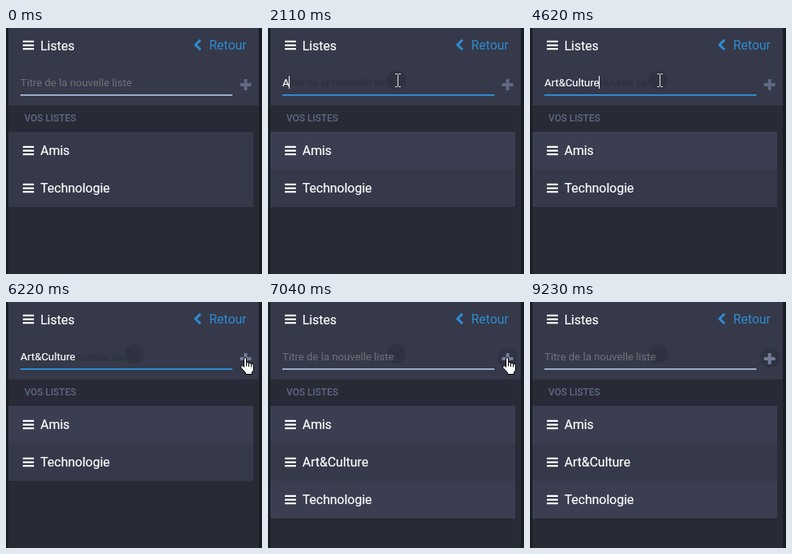
An HTML page that plays this animation: 320 by 308 pixels, repeating every 9.84 s.

```html
<!DOCTYPE html>
<html lang="fr">
<head>
<meta charset="utf-8">
<title>Listes</title>
<style>
  html, body { margin: 0; width: 100%; height: 100%; overflow: hidden; background: #282b36; }
  svg { display: block; width: 320px; height: 308px; font: 16px Roboto, Arial, sans-serif; }
  text { white-space: pre; }
  .label { fill: #fff; stroke: #fff; stroke-width: .2px; }
  .field { font-size: 13.333px; }
  .typed { fill: #fff; stroke: #fff; stroke-width: .15px; }
  .section { font-size: 12px; font-weight: 500; fill: #606984; }
  .link { fill: #2f8bd0; }
</style>
</head>
<body>
<svg viewBox="0 0 320 308">
  <defs>
    <g id="bars" fill="#fff">
      <rect width="14" height="2.3" rx=".6"/>
      <rect y="4.6" width="14" height="2.3" rx=".6"/>
      <rect y="9.2" width="14" height="2.3" rx=".6"/>
    </g>
  </defs>

  <rect width="320" height="308" fill="#282b36"/>
  <rect x="3" width="313" height="97" fill="#353949"/>
  <use href="#bars" x="21" y="15.8"/>
  <text class="label" x="43" y="28">Listes</text>
  <path class="link" d="M242 13.8l2.1 2.1-5.1 5.1 5.1 5.1-2.1 2.1-7.2-7.2z"/>
  <text class="link" x="254" y="27">Retour</text>

  <circle id="inputShade" cx="160.5" cy="65" r="12" fill="#2f3341"/>
  <circle id="plusShade" cx="299.5" cy="70" r="12" fill="#2f3341"/>
  <text id="hint" class="field" x="18" y="73">Titre de la nouvelle liste</text>
  <rect id="cover" x="18" y="60" height="16" fill="#353949"/>
  <text id="typed" class="field typed" x="18" y="73"></text>
  <rect id="caret" y="60" width="1" height="16" fill="#fff"/>
  <rect id="line" x="18" y="83" width="265" height="2"/>
  <path id="plus" d="M297.5 64h4v5h5v4h-5v5h-4v-5h-5v-4h5z" stroke-linejoin="round"/>

  <text class="section" x="23" y="117">VOS LISTES</text>
  <g id="rows"></g>
  <path d="M0 0h3v308h-3zM316 0h4v308h-4z" fill="#1b1d25"/>

  <circle id="click" r="12" fill="#b9b320" fill-opacity=".88"/>
  <g id="cursor">
    <path id="beam" d="M-3.5-7.5h2.5l1 1 1-1h2.5M0-6.5v14M-3.5 8.5h2.5l1-1 1 1h2.5" fill="none" stroke="#e8e8e8"/>
    <path id="arrow" d="M.5.5v15.5l3.6-3.4 2.5 5.7 2.3-1-2.5-5.6h5z" fill="#fff" stroke="#000"/>
    <g id="hand" transform="translate(-6 -1)" stroke="#000">
      <path fill="#fff" d="M4.5 2Q4.5.5 6 .5T7.5 2V7.5Q7.5 6.3 9 6.3T10.5 8Q10.7 7.1 12 7.3T13.5 9Q14 8.2 15 8.6T16.5 10.5V15Q16.5 17.5 14.5 19V21.5H6.5V19.5L1 13.5Q0 12 1 11T3.5 11.3L4.5 12.5Z"/>
      <path fill="none" d="M7.5 7v4.5M10.5 8v4M13.5 9v3.5"/>
    </g>
  </g>
</svg>
<script>
const LOOP = 9840;
const WORD = "Art&Culture";
const BRIGHT = "#3a3e50", DARK = "#353949";

// When each letter of WORD appears
const KEYS = [2110, 2340, 2570, 3260, 3570, 3870, 4020, 4250, 4330, 4550, 4620];
// The caret flips at each of these times
const BLINKS = [1180, 1650, 2110, 3110, 3260, 5160, 5700, 6220, 6680, 6970];
const FOCUS = 1180, CLEAR = 6970, ADDED = 7040;

// time, shape, x, y
const MOVES = [
  [0, "", 0, 0],
  [450, "hand", 291, 152], [520, "hand", 273, 140], [590, "arrow", 249, 124],
  [660, "arrow", 223, 107], [740, "arrow", 197, 91], [810, "beam", 173, 72],
  [880, "beam", 162.5, 65],
  [6080, "arrow", 224, 68], [6150, "arrow", 278, 70], [6220, "hand", 299, 70],
  [8420, "hand", 303, 70],
  [8650, "hand", 307, 78], [8720, "arrow", 309, 114], [8790, "hand", 307, 162],
  [8860, "hand", 301, 212], [8930, "hand", 295, 257],
  [9160, "arrow", 288, 291], [9230, "", 0, 0]
];
const CLICKS = [[1110, 1270, 160.5, 65], [6830, 6970, 299.5, 70]];

const $ = id => document.getElementById(id);
const show = (id, on) => $(id).setAttribute("display", on ? "inline" : "none");
const set = (id, attrs) => { for (const k in attrs) $(id).setAttribute(k, attrs[k]); };
const between = (t, a, b) => t >= a && t < b;
const passed = (list, t) => list.filter(at => at <= t).length;

const rows = ["Amis", "Technologie", "Technologie"].map((name, i) => {
  const g = document.createElementNS("http://www.w3.org/2000/svg", "g");
  g.setAttribute("transform", `translate(0 ${130 + i * 47})`);
  g.innerHTML = `<rect x="3" width="306" height="47"/>
    <use href="#bars" x="21" y="17.8"/><text class="label" x="43" y="29">${name}</text>`;
  $("rows").append(g);
  return { g, box: g.querySelector("rect"), text: g.querySelector("text") };
});

function drawField(t) {
  const focused = between(t, FOCUS, CLEAR);
  const typing = between(t, KEYS[0], CLEAR);
  const text = typing ? WORD.slice(0, passed(KEYS, t)) : "";
  $("typed").textContent = text;
  const end = text ? $("typed").getComputedTextLength() : 0;
  set("cover", { width: typing ? end + 1 : 0 });
  set("caret", { x: 18 + Math.max(0, Math.round(end) - 1) });
  show("caret", passed(BLINKS, t) % 2);
  set("hint", { fill: typing ? "#2c303c" : "#717278" });
  set("line", { fill: focused ? "#2f8bd0" : "#9baec8" });
  set("plus", { fill: t >= 6220 ? "#747d98" : "#606984" });
  show("inputShade", t >= 1270);
  show("plusShade", t >= CLEAR);
}

function drawRows(t, shape, y) {
  const added = t >= ADDED;
  rows[1].text.textContent = added ? WORD : "Technologie";
  rows[2].g.setAttribute("display", added ? "inline" : "none");
  const lit = [t >= 450, false, true];
  rows.forEach((row, i) => {
    const top = 130 + i * 47;
    const hover = shape === "hand" && between(y, top, top + 47);
    row.box.setAttribute("fill", lit[i] || hover ? BRIGHT : DARK);
  });
}

function draw(t) {
  const [, shape, x, y] = MOVES[passed(MOVES.map(m => m[0]), t) - 1];
  drawField(t);
  drawRows(t, shape, y);
  for (const id of ["beam", "arrow", "hand"]) show(id, id === shape);
  set("cursor", { transform: `translate(${x} ${y})` });
  const hit = CLICKS.find(([a, b]) => between(t, a, b));
  show("click", hit);
  if (hit) set("click", { cx: hit[2], cy: hit[3] });
}

const start = performance.now();
function tick() {
  draw((performance.now() - start) % LOOP);
  requestAnimationFrame(tick);
}
tick();
</script>
</body>
</html>
```
